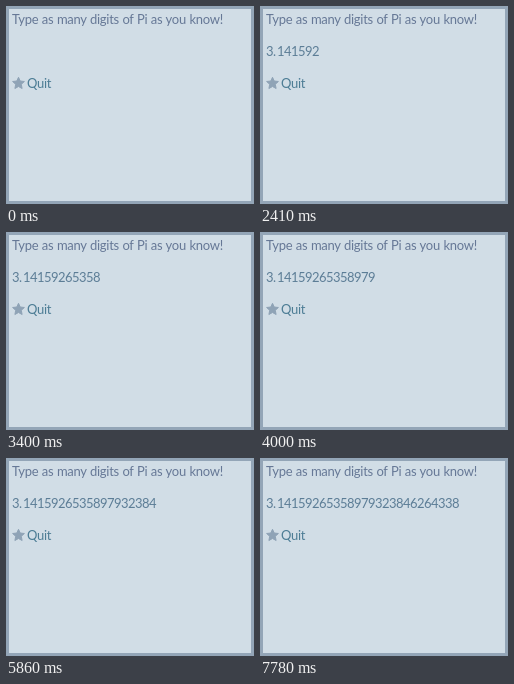
An HTML page for the animation above (8 s loop, 248 px wide and 198 px high).

```html
<!DOCTYPE html>
<html lang="en">
<head>
<meta charset="utf-8">
<title>Digits of Pi</title>
<style>
  html, body { margin: 0; width: 100%; height: 100%; overflow: hidden; background: #d1dde6; }
  svg { display: block; }
  text { font: 13px Lato, sans-serif; letter-spacing: -.28px; word-spacing: .5px; white-space: pre; }
  .typed { fill: #5c7d96; letter-spacing: -.54px; font-kerning: none; font-variant-numeric: tabular-nums lining-nums; }
</style>
</head>
<body>
<svg width="248" height="198" viewBox="0 0 248 198">
  <rect x="1.5" y="1.5" width="245" height="195" fill="#d1dde6" stroke="#93a5b7" stroke-width="3"/>
  <text x="6" y="18" fill="#667896">Type as many digits of Pi as you know!</text>
  <text id="whole" class="typed" x="6" y="50"></text>
  <text id="decimals" class="typed" x="17" y="50"></text>
  <path d="M12.5 71.3l1.7 3.7 4.2.5-3.1 2.8.8 4.2-3.6-2-3.6 2 .8-4.2-3.1-2.8 4.2-.5z"
        fill="#8fa3b6" stroke="#8fa3b6" stroke-linejoin="round"/>
  <text x="21" y="82" fill="#4d7d95">Quit</text>
</svg>
<script>
const LOOP = 8000;
const whole = document.getElementById('whole');
const decimals = document.getElementById('decimals');

// Digits come in bursts, evenly spaced from the first key to the last
const bursts = [
  { text: '3.', from: 1000, to: 1180 },
  { text: '141592', from: 1450, to: 2410 },
  { text: '653589', from: 2590, to: 3580 },
  { text: '79', from: 3790, to: 4000 },
  { text: '323', from: 4840, to: 5200 },
  { text: '84', from: 5500, to: 5860 },
  { text: '626433', from: 6190, to: 7120 },
  { text: '8', from: 7780, to: 7780 }
];

function typedPart({ text, from, to }, time) {
  if (time < from) return '';
  const step = (to - from) / (text.length - 1) || LOOP;
  return text.slice(0, 1 + Math.floor((time - from) / step + 1e-6));
}

function draw() {
  const time = performance.now() % LOOP;
  const typed = bursts.map(burst => typedPart(burst, time)).join('');
  whole.textContent = typed.slice(0, 2);
  decimals.textContent = typed.slice(2);
  requestAnimationFrame(draw);
}
draw();
</script>
</body>
</html>
```
